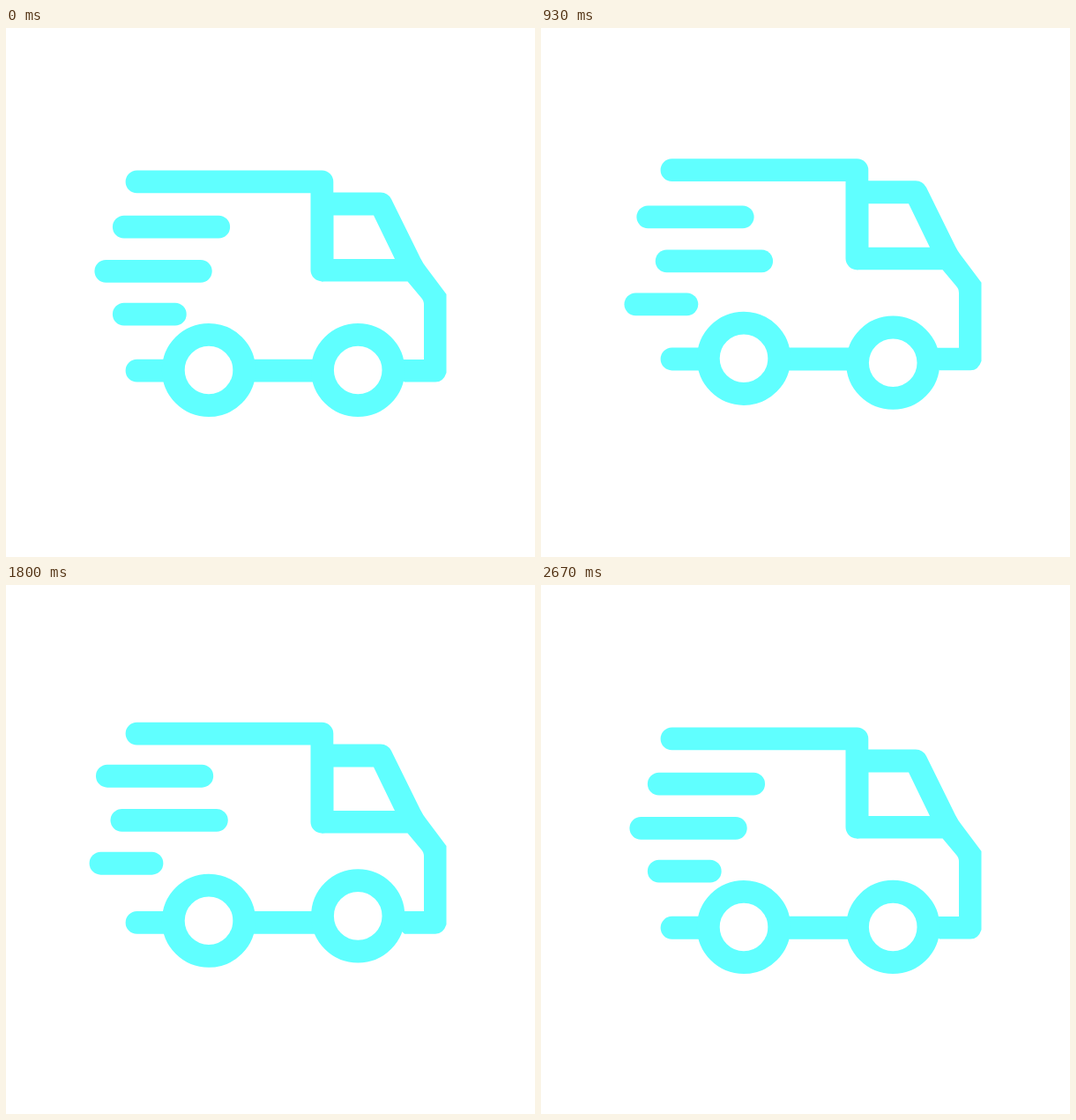
Recreate the animation shown at these times as an HTML page. Size 600 by 600 pixels, loop 2700 ms.

```html
<!DOCTYPE html>
<html lang="en">
<head>
<meta charset="utf-8">
<title>Delivery truck</title>
<style>
  html, body { margin: 0; height: 100%; overflow: hidden; background: #fff; }
  svg { display: block; width: 100vw; height: 100vh; }
  .stroke { fill: none; stroke: #60ffff; stroke-width: 25.8; stroke-linecap: round; stroke-linejoin: round; }
  .wheel { fill: #fff; }
  .solid { fill: #60ffff; fill-rule: evenodd; }
</style>
</head>
<body>
<svg viewBox="0 0 600 600">
  <g id="body">
    <path class="stroke" d="M148.5 174.5H358.4V274.6M148.5 388.8H399"/>
    <path class="solid" d="M346 186.5H425Q433 186.5 437 194L470 261Q473 267 477 272L499.5 302V391Q496 401.6 487 401.6H452L449 399V376H474V314Q474 309 471 306L455.5 287.5H358V186.5Z
      M371.3 212.5V262H441L417 212.5Z"/>
  </g>
  <g class="stroke">
    <path id="line1" d="M133.8 225.7H241.2"/>
    <path id="line2" d="M113.3 275.8H220.8"/>
    <path id="line3" d="M133.8 324.7H191.8"/>
    <circle id="rear" class="wheel" cx="230" cy="388" r="40.2"/>
    <circle id="front" class="wheel" cx="399.2" cy="388" r="40.2"/>
  </g>
</svg>
<script>
  const LOOP = 2700, STEP = 30;

  // Sine-eased swing: 0 at start, 1 at peak, 0 again at end.
  function swing(t, peak, start = 0, end = LOOP) {
    if (t > LOOP + start) t -= LOOP;
    if (t >= end) return 0;
    const p = t < peak ? (t - start) / (peak - start) : (end - t) / (end - peak);
    return (1 - Math.cos(Math.PI * p)) / 2;
  }

  function move(id, x, y) {
    document.getElementById(id).setAttribute("transform", `translate(${x} ${y})`);
  }

  function draw(now) {
    const t = Math.floor((now % LOOP) / STEP) * STEP;
    const lineY = -13.4 * swing(t, 1250, 0, 2660);
    move("body", 0, -13.5 * swing(t, 1010, -60, 2470));
    move("rear", 0, -13.5 * swing(t, 1030, 0, 2650));
    move("front", 0, -13.5 * swing(t, 1620));
    move("line1", -20.3 * swing(t, 1620), lineY);
    move("line2", 30.8 * swing(t, 1080), lineY);
    move("line3", -34.5 * swing(t, 1370), lineY);
  }

  const began = performance.now();
  function frame() {
    draw(performance.now() - began);
    requestAnimationFrame(frame);
  }
  frame();
</script>
</body>
</html>
```
